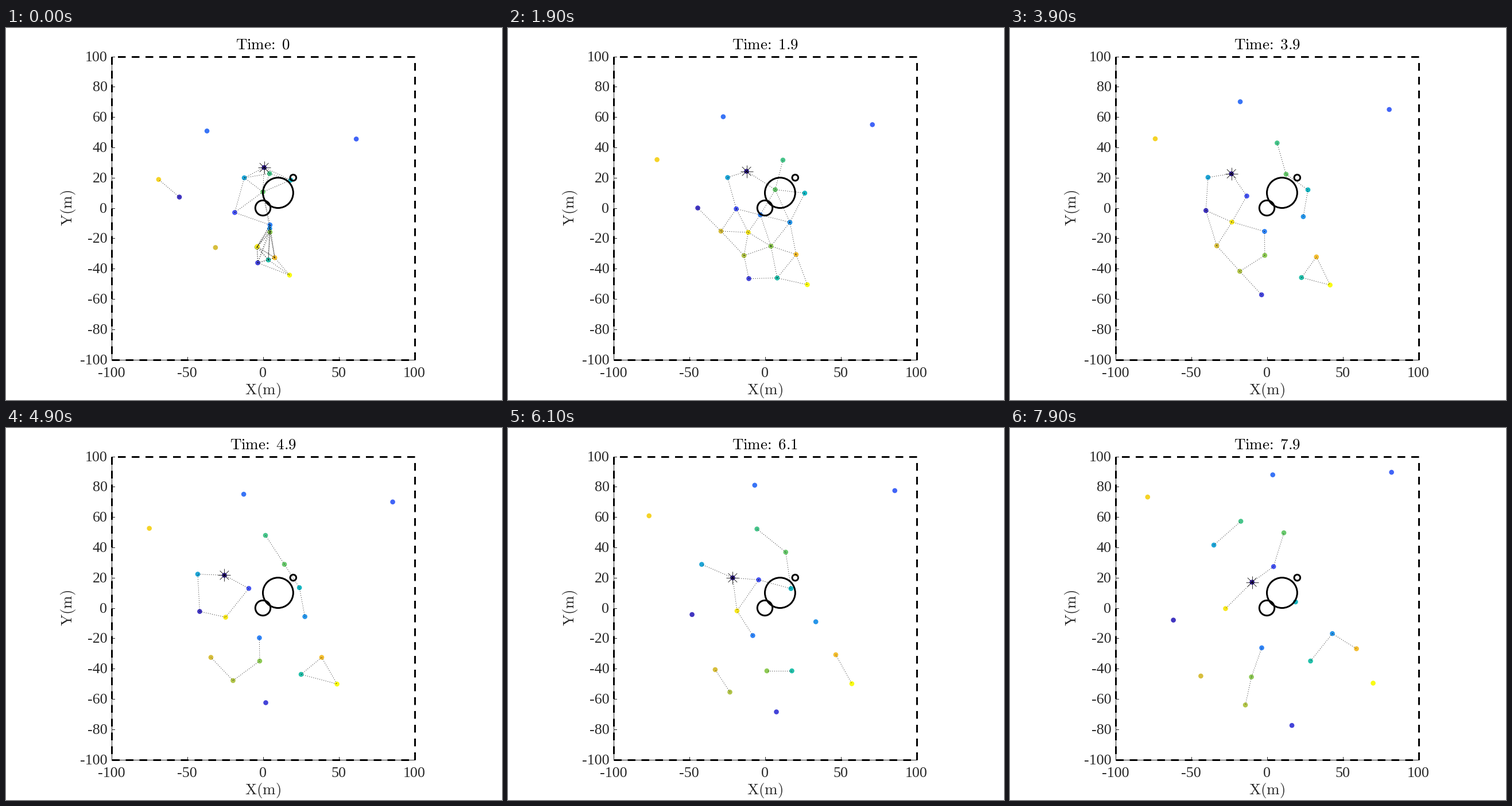
Write a matplotlib script that moves like this. It is 864 by 648 pixels and loops after 8000 ms.

```python
import numpy as np
import matplotlib.pyplot as plt
from matplotlib.animation import FuncAnimation
from matplotlib.collections import LineCollection
from matplotlib.colors import LinearSegmentedColormap

W, H, DPI = 864, 648, 72
FRAMES, STEP = 80, 100
TIMES = np.arange(FRAMES) * STEP / 1000
SPEED, REACH = 7, 25         # cruising speed in m/s, link range in m
SCALE = 2.64                 # pixels per metre
CRUISE = np.array([0, 1.9, 4.9, 7.9])
DODGE = np.array([0, 1.9, 4.9, 6.1, 7.9])
INK = "#262626"


def px(x, y):
    return 447 + SCALE * x, 313 - SCALE * y


def agent(*pts):
    """Smooth curve through way-points x+yj, one more when the agent dodges."""
    p = np.array(pts)
    keys = DODGE if len(p) == len(DODGE) else CRUISE
    slope = np.gradient(p, keys)
    i = np.clip(np.searchsorted(keys, TIMES, side="right") - 1, 0, len(p) - 2)
    h = keys[i + 1] - keys[i]
    u = (TIMES - keys[i]) / h
    w = u * u * (3 - 2 * u)
    return (p[i] * (1 - w) + p[i + 1] * w
            + h * u * (1 - u) * (slope[i] * (1 - u) - slope[i + 1] * u))


def drifter(start, heading, turn=8, heading2=0):
    """Straight flight that changes its heading (degrees) once."""
    a, b = np.exp(1j * np.radians([heading, heading2]))
    return start + SPEED * (a * np.minimum(TIMES, turn) + b * np.maximum(TIMES - turn, 0))


# Positions in metres, ordered by colour; the leader comes first.
paths = np.array([
    agent(.8 + 26.7j, -12.1 + 24.2j, -25.4 + 21.6j, -9.8 + 17j),
    agent(-55.1 + 7.2j, -44.3 + 0j, -41.7 - 2.3j, -61.7 - 8j),
    agent(-3.4 - 36.2j, -10.6 - 46.6j, 1.9 - 62.5j, 16.5 - 77.5j),
    agent(-18.6 - 3j, -18.9 - .6j, -9.3 + 12.9j, 4.4 + 27.3j),
    drifter(61.6 + 45.5j, 45.5, 5.25, 106),
    drifter(-36.9 + 50.8j, 45, 6.1, 33),
    agent(4.7 - 11.2j, -3 - 4.5j, -2.3 - 19.7j, -8 - 18.2j, -3.4 - 26.3j),
    agent(4.5 - 13.6j, 16.5 - 9.5j, 27.7 - 5.7j, 43.2 - 16.9j),
    agent(-12.3 + 19.9j, -24.6 + 20.1j, -43 + 22.3j, -35 + 41.5j),
    agent(18.4 + 18.4j, 26.3 + 9.8j, 24.1 + 13.4j, 17.2 + 12.8j, 18.9 + 4j),
    agent(3.6 - 34.3j, 8.1 - 46.2j, 25.2 - 43.8j, 17.8 - 41.5j, 28.8 - 35j),
    agent(4.4 + 22.7j, 11.9 + 31.6j, 1.7 + 47.9j, -17.2 + 57.2j),
    agent(0 + 10.6j, 6.8 + 12.1j, 14.2 + 28.8j, 11.2 + 49.6j),
    agent(4.7 - 15.9j, 4 - 25.2j, -2.1 - 35j, 1.3 - 41.5j, -10.2 - 45.5j),
    agent(-4 - 25.8j, -13.8 - 31.4j, -19.7 - 47.9j, -23.1 - 55.5j, -14.2 - 64j),
    agent(-31.3 - 26.1j, -29 - 15.3j, -34.3 - 32.6j, -32.8 - 40.7j, -43.6 - 44.9j),
    agent(7.8 - 32.8j, 20.6 - 30.7j, 38.8 - 32.6j, 59.1 - 26.9j),
    drifter(-68.8 + 18.8j, 100.3),
    agent(-3.6 - 25.4j, -11 - 16.1j, -24.6 - 6.1j, -18.4 - 1.9j, -27.3 - .4j),
    agent(17.6 - 44.3j, 28 - 50.6j, 48.9 - 50.2j, 70.1 - 49.6j),
])
spots = np.stack(px(paths.real, paths.imag), axis=-1)
I, J = np.triu_indices(len(paths), 1)

ramp = LinearSegmentedColormap.from_list("ramp", [
    "#3e26a8", "#4757f7", "#2d8af6", "#12beb9", "#81cc59", "#f3ba33", "#f9fb15"])
colors = ramp(np.linspace(0, 1, len(paths)))

fig = plt.figure(figsize=(W / DPI, H / DPI), dpi=DPI, facecolor="white")
ax = fig.add_axes([0, 0, 1, 1])
ax.set(xlim=(-.5, W - .5), ylim=(H - .5, -.5))
ax.axis("off")


def tick_text(x, y, value, ha):
    ax.text(x, y, str(value), family="Liberation Serif", size=26,
            color=INK, ha=ha, va="baseline")


def label(x, y, text, **kw):
    return ax.text(x, y, text, size=27, math_fontfamily="cm", ha="center",
                   va="baseline", rotation_mode="anchor", **kw)


left, top = px(-100, 100)
right, bottom = px(100, -100)
ax.plot([left, left, right], [top, bottom, bottom], color=INK, lw=1)
for v in range(-100, 101, 20):
    y = px(0, v)[1]
    ax.plot([left, left + 5], [y, y], color=INK, lw=1)
    tick_text(176, y + 8, v, "right")
for v in range(-100, 101, 50):
    x = px(v, 0)[0]
    ax.plot([x, x], [bottom, bottom - 5], color=INK, lw=1)
    tick_text(x, 607.5, v, "center")
ax.plot([left, right, right, left, left], [bottom, bottom, top, top, bottom],
        color="black", lw=3, ls=(0, (4.5, 3.5)), dash_capstyle="butt")

label(447, 637.5, r"$\mathrm{X(m)}$", color=INK)
label(115, 313, r"$\mathrm{Y(m)}$", color=INK, rotation=90)
title = label(447.5, 36, "", color="black")

for cx, cy, r in ((0, 0, 5), (10, 10, 10), (20, 20, 2)):
    ax.add_patch(plt.Circle(px(cx, cy), r * SCALE, fill=False, ec="black", lw=3, zorder=6))

dots = ax.scatter(*spots[:, 0].T, s=8.6 ** 2, c=colors, linewidths=0, zorder=3)
links = LineCollection([], colors="black", linewidths=0.8,
                       linestyles=[(0, (1.4, 3.2))], zorder=4)
star = LineCollection([], colors="black", linewidths=0.8, zorder=5)
ax.add_collection(links)
ax.add_collection(star)

angles = np.arange(4) * np.pi / 4
arms = 11 * np.column_stack([np.cos(angles), np.sin(angles)])


def update(n):
    pos, z = spots[:, n], paths[:, n]
    near = abs(z[I] - z[J]) <= REACH
    dots.set_offsets(pos)
    links.set_segments(np.stack([pos[I[near]], pos[J[near]]], axis=1))
    star.set_segments(np.stack([pos[0] - arms, pos[0] + arms], axis=1))
    title.set_text(r"$\mathrm{Time\hspace{-0.2}:\hspace{0.3}%g}$" % (n / 10))
    return dots, links, star, title


anim = FuncAnimation(fig, update, frames=FRAMES, interval=STEP, repeat=True,
                     repeat_delay=0, blit=False)
plt.show()
```
